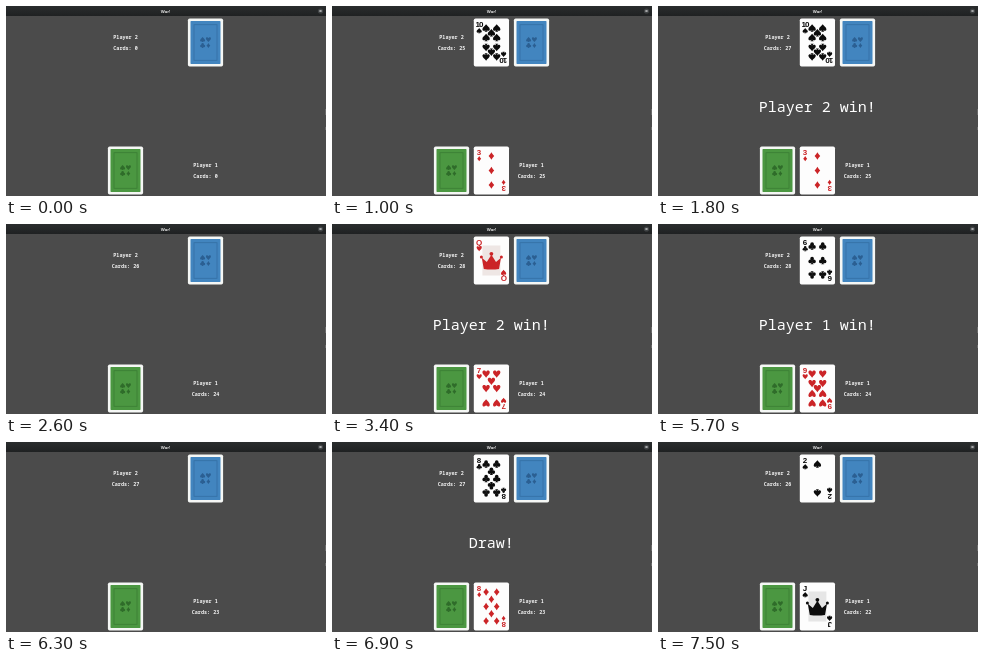
An HTML page for the animation above (8 s loop, 320 px wide and 190 px high).

```html
<!DOCTYPE html>
<html lang="en">
<head>
<meta charset="utf-8">
<title>War!</title>
<style>
  html, body { margin: 0; width: 100%; height: 100%; overflow: hidden; background: #4b4b4b; }
  svg { display: block; width: 100vw; height: 100vh; }
  text { text-anchor: middle; }
  .label { font: 600 5.1px "Noto Sans Mono", "DejaVu Sans Mono", monospace; fill: #f4f4f4; }
  .result { font: 500 15px "Noto Sans Mono", "DejaVu Sans Mono", monospace; fill: #fff; }
  .rank { font: 700 8px "Liberation Sans", Arial, sans-serif; }
  .title { font: 700 4.2px "Open Sans", "Noto Sans", sans-serif; fill: #e4e4e4; }
</style>
</head>
<body>
<svg viewBox="0 0 320 190" preserveAspectRatio="none">
  <defs>
    <linearGradient id="bar" x2="0" y2="1">
      <stop offset="0" stop-color="#2a2d2e"/>
      <stop offset="1" stop-color="#1f2122"/>
    </linearGradient>
    <path id="heart" d="M0 5C-1.6 2.4-5 .6-5-2.2C-5-5.4-1-5.6 0-2.8C1-5.6 5-5.4 5-2.2C5 .6 1.6 2.4 0 5Z"/>
    <path id="diamond" d="M0-5Q1.6-2 3.8 0Q1.6 2 0 5Q-1.6 2-3.8 0Q-1.6-2 0-5Z"/>
    <path id="spade" d="M0-5C1.6-2.6 5-.8 5 1.6C5 4.2 1.8 4.4.7 2.6Q1 4.4 2.2 5H-2.2Q-1 4.4-.7 2.6C-1.8 4.4-5 4.2-5 1.6C-5-.8-1.6-2.6 0-5Z"/>
    <g id="club">
      <circle cy="-2.5" r="2.5"/><circle cx="-2.5" cy="1.2" r="2.5"/><circle cx="2.5" cy="1.2" r="2.5"/>
      <path d="M-1-1H1L.7 2.6Q1 4.4 2.2 5H-2.2Q-1 4.4-.7 2.6Z"/>
    </g>
    <g id="crown">
      <path d="M-7.6 8.2L-9.6-3L-4.6 1.2L0-6L4.6 1.2L9.6-3L7.6 8.2Q0 9.4-7.6 8.2Z"/>
      <circle cx="-10" cy="-3.8" r="1.5"/><circle cx="10" cy="-3.8" r="1.5"/><circle cy="-7" r="1.9"/>
    </g>
  </defs>
  <rect width="320" height="190" fill="#4b4b4b"/>
  <rect width="320" height="10" fill="url(#bar)"/>
  <text class="title" x="159.5" y="6.6">War!</text>
  <circle cx="314.5" cy="5" r="2.6" fill="#414446"/>
  <path d="M313.5 4l2 2m0-2l-2 2" stroke="#eee" stroke-width=".7"/>
  <path d="M319.6 103v6m0 12v3" stroke="#777" stroke-width=".8"/>
  <g id="decks"></g>
  <g id="table"></g>
</svg>
<script>
const LOOP = 8000;
const TOP = 36.5, BOTTOM = 164.5;

// time, player 2 cards, player 1 cards, player 2 card, player 1 card, message
const STEPS = [
  [0, 0, 0],
  [500, 26, 26],
  [1000, 25, 25, "10 spade", "3 diamond"],
  [1800, 27, 25, "10 spade", "3 diamond", "Player 2 win!"],
  [2600, 26, 24],
  [2700, 26, 24, "Q heart", "7 heart"],
  [3400, 28, 24, "Q heart", "7 heart", "Player 2 win!"],
  [4000, 27, 23, "4 spade", "2 club"],
  [4500, 29, 23, "4 spade", "2 club", "Player 2 win!"],
  [5200, 28, 22, "6 club", "9 heart"],
  [5700, 28, 24, "6 club", "9 heart", "Player 1 win!"],
  [6300, 27, 23],
  [6400, 27, 23, "8 club", "8 diamond"],
  [6900, 27, 23, "8 club", "8 diamond", "Draw!"],
  [7500, 26, 22, "2 spade", "J spade"]
];

const text = (cls, x, y, s, extra = "") => `<text class="${cls}" x="${x}" y="${y}" ${extra}>${s}</text>`;
const symbol = (id, x, y, size, flip) =>
  `<use href="#${id}" transform="translate(${x} ${y}) scale(${size / 10})${flip ? " rotate(180)" : ""}"/>`;
const plate = fill => `<rect x="-17.6" y="-24" width="35.2" height="48" rx="1.8" fill="${fill}"/>`;

function deck(x, y, fill, dark) {
  const suits = ["spade", "heart", "club", "diamond"]
    .map((s, i) => symbol(s, i % 2 ? 2.9 : -2.9, i < 2 ? -2.9 : 2.9, 5)).join("");
  return `<g transform="translate(${x} ${y})">${plate("#f5f7f5")}
    <rect x="-15" y="-21.4" width="30" height="42.8" rx=".6" fill="${fill}"/>
    <rect x="-11.5" y="-17.8" width="23" height="35.6" fill="none" stroke="${dark}" stroke-width=".8" opacity=".6"/>
    <g fill="${dark}">${suits}</g></g>`;
}

const column = ys => ys.map(y => [0, y]);
const pairs = ys => ys.flatMap(y => [[-5.3, y], [5.3, y]]);

function pips(n) {
  const r = 14.5;
  if (n < 4) return column(n === 3 ? [-r, 0, r] : [-r, r]);
  const rows = n > 8 ? [-r, -5, 5, r] : n > 5 ? [-r, 0, r] : [-r, r];
  const middle = { 5: [0], 7: [-7.3], 8: [-7.3, 7.3], 9: [0], 10: [-9.7, 9.7] }[n] || [];
  return [...pairs(rows), ...column(middle)];
}

function card(name, y) {
  const [rank, suit] = name.split(" ");
  const red = suit === "heart" || suit === "diamond";
  const color = red ? "#cb2427" : "#0c0c0c";
  const corner = text("rank", -12.4, -15.7, rank, rank === "10" ? 'letter-spacing="-1"' : "") +
    symbol(suit, -12.2, -11.8, 5.2);
  const center = +rank
    ? pips(+rank).map(([px, py]) => symbol(suit, px, py, 7.4, py > 0)).join("")
    : `<rect x="-9" y="-15" width="18" height="30" fill="${red ? "#eee6e4" : "#e6e6e6"}"/>` +
      symbol("crown", 0, .3, 10);
  return `<g transform="translate(159.4 ${y})" fill="${color}">${plate("#fdfdfd")}
    ${center}${corner}<g transform="rotate(180)">${corner}</g></g>`;
}

const info = (x, y, player, count) =>
  text("label", x, y, `Player ${player}`) + text("label", x, y + 11, `Cards: ${count}`);

function draw([, count2, count1, card2, card1, message]) {
  document.getElementById("table").innerHTML =
    info(119.5, 32.7, 2, count2) + info(199.5, 160.7, 1, count1) +
    (card2 ? card(card2, TOP) + card(card1, BOTTOM) : "") +
    (message ? text("result", 159.2, 105.8, message) : "");
}

document.getElementById("decks").innerHTML =
  deck(199.5, TOP, "#4285bf", "#2b5f92") + deck(119.5, BOTTOM, "#4b9741", "#2f6c2a");

let shown;
function tick() {
  const t = performance.now() % LOOP;
  const step = STEPS.findLast(s => s[0] <= t);
  if (step !== shown) draw(shown = step);
  requestAnimationFrame(tick);
}
tick();
</script>
</body>
</html>
```
